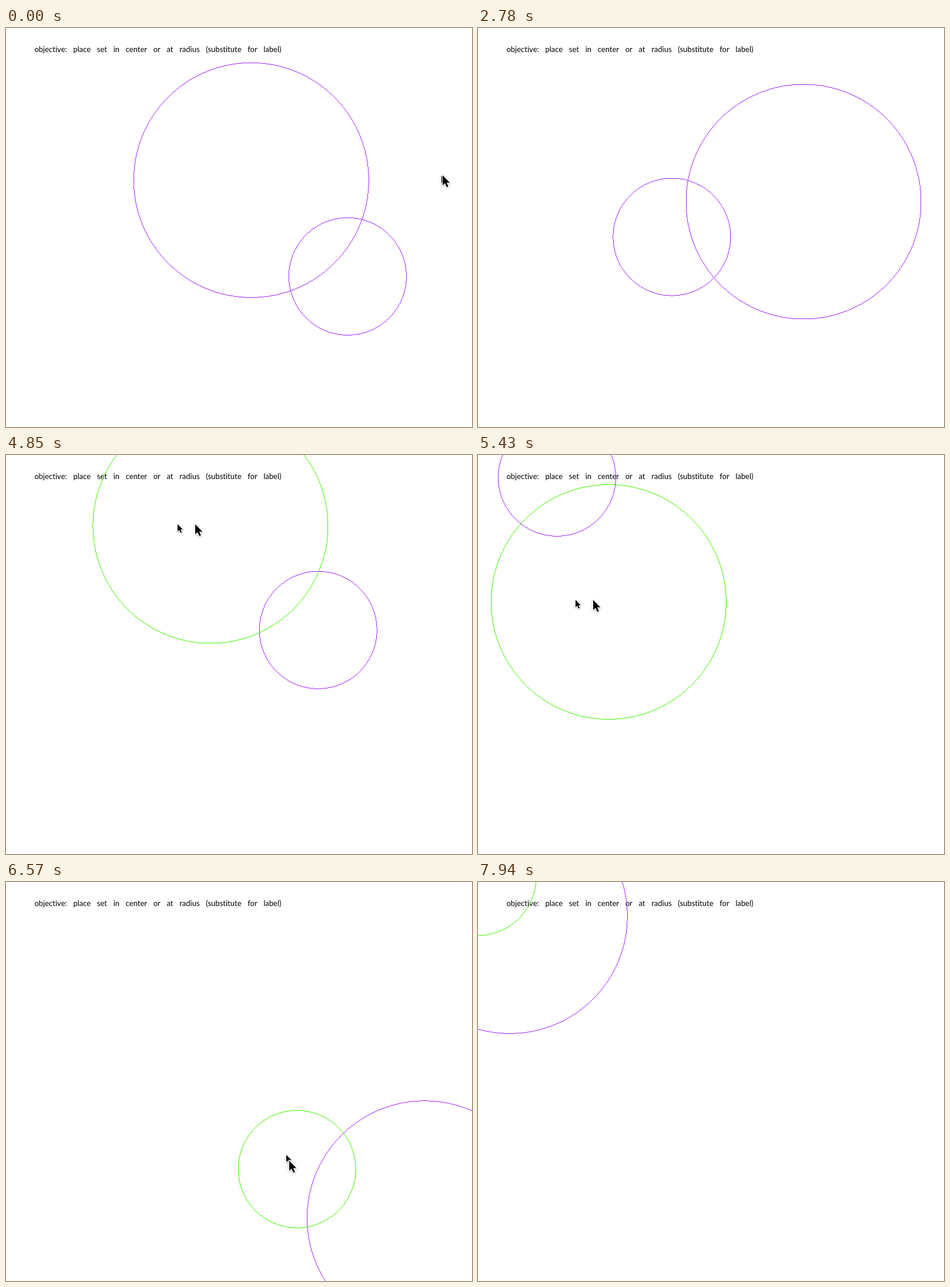
Recreate the animation shown at these times as an HTML page with a canvas. Size 793 by 680 pixels, loop 7990 ms.

```html
<!DOCTYPE html>
<html lang="en">
<head>
<meta charset="utf-8">
<title>Circle set</title>
<style>
  html, body { margin: 0; width: 100%; height: 100%; overflow: hidden; background: #fff; }
  canvas { display: block; }
</style>
</head>
<body>
<canvas id="stage" width="793" height="680"></canvas>
<script>
const LOOP = 7990, DRAG_START = 3970;
const STEP = 59.25;      // ms between redraws
const FLICK_STEPS = 3;   // redraws in one quick move
const GAP = 232;         // usual distance between the centres
const PURPLE = '#a32aff', GREEN = '#40f500';
const TEXT = 'objective: place set in center or at radius (substitute for label)';

const ctx = document.getElementById('stage').getContext('2d');
const arrow = new Path2D('M0 0V14L3.3 11 5.8 16.5 8 15.5 5.6 10.3H10Z');

// Resting places: start time, centre of the large circle, angle to the small one
const rests = [
  [-1000, 417.3, 259.3, 45],
  [60, 249, 490, -45],
  [1310, 201.3, 247.3, 107],
  [2130, 479, 359, 180],
  [2780, 704, 170, 135],
  [3490, 690, 560, 272]
];

// Turning points of the drag: redraw, centre, angle, distance
const turns = [
  [0, 688, 520, 225, GAP],
  [3, 661.95, 388.5, 95.2, GAP],
  [15, 347.95, 120.95, 44.05, 255],
  [21, 195, 170, -50, GAP],
  [27, 260, 320, -132, GAP],
  [33, 431.95, 683.95, -114.06, 252.7],
  [41, 680, 590, -148, GAP],
  [58, 690.4, 477.9, -196.1, GAP],
  [67, 54.2, 58.2, -129.4, 86.7]
];

// What is held from which redraw on, and where the two pointers grip it
const holds = [
  { from: 0, grips: [[29, -83], [42, -83]] },
  { from: 14, green: 'large', grips: [[-56, -3], [-26, -3]] },
  { from: 42, green: 'small', grips: [[-18, -24], [-13, -14]] }
];

function restPose(t) {
  const i = rests.findLastIndex(r => r[0] <= t);
  const to = rests[i], from = rests[Math.max(0, i - 1)];
  const f = Math.min(1, (Math.floor((t - to[0]) / STEP) + 1) / FLICK_STEPS);
  const mixed = to.map((v, n) => from[n] + (v - from[n]) * f);
  return [...mixed.slice(1), GAP];
}

// Smooth curve through the turning points
function dragPose(n) {
  const last = turns.length - 1;
  const i = Math.min(last - 1, turns.findLastIndex(k => k[0] <= n));
  const a = turns[i], b = turns[i + 1];
  const before = turns[Math.max(0, i - 1)], after = turns[Math.min(last, i + 2)];
  const span = b[0] - a[0], f = (n - a[0]) / span, g = 1 - f;
  return [1, 2, 3, 4].map(c => {
    const va = (b[c] - before[c]) / (b[0] - before[0]) * span;
    const vb = (after[c] - a[c]) / (after[0] - a[0]) * span;
    return g * g * (1 + 2 * f) * a[c] + f * f * (3 - 2 * f) * b[c]
      + f * g * g * va - f * f * g * vb;
  });
}

// One-pixel circle without smoothing
function ring({ x, y, r }, color) {
  ctx.fillStyle = color;
  const reach = r * Math.SQRT1_2;
  const arc = (c, d, plot) => {
    for (let p = Math.floor(c - reach); p <= c + reach; p++) {
      const h = Math.sqrt(r * r - (p + 0.5 - c) ** 2);
      plot(p, Math.floor(d - h));
      plot(p, Math.floor(d + h));
    }
  };
  arc(x, y, (p, q) => ctx.fillRect(p, q, 1, 1));
  arc(y, x, (p, q) => ctx.fillRect(q, p, 1, 1));
}

function pointer(x, y, size) {
  ctx.save();
  ctx.translate(Math.round(x), Math.round(y));
  ctx.scale(size, size);
  ctx.shadowColor = 'rgba(0,0,0,.35)';
  ctx.shadowBlur = 3;
  ctx.shadowOffsetY = 1;
  ctx.strokeStyle = '#fff';
  ctx.lineWidth = 1.6;
  ctx.stroke(arrow);
  ctx.shadowColor = 'transparent';
  ctx.fillStyle = '#000';
  ctx.fill(arrow);
  ctx.restore();
}

function pointers(x, y, [a, b]) {
  pointer(x + a[0], y + a[1], 0.88);
  pointer(x + b[0], y + b[1], 1.22);
}

function label() {
  ctx.fillStyle = '#000';
  ctx.font = '13px Lato, sans-serif';
  ctx.letterSpacing = '0.01px'; // keeps letters from joining
  ctx.wordSpacing = '7.3px';
  ctx.fillText(TEXT, 48.4, 41);
}

function draw(t) {
  const n = Math.round((t - DRAG_START) / STEP);
  const dragging = t >= DRAG_START;
  const [x, y, degrees, gap] = dragging ? dragPose(Math.min(n, 67)) : restPose(t);
  const angle = degrees * Math.PI / 180;
  const large = { x, y, r: 200 };
  const small = { x: x + gap * Math.cos(angle), y: y + gap * Math.sin(angle), r: 100 };
  const hold = dragging ? holds.findLast(h => h.from <= n) : {};

  ctx.fillStyle = '#fff';
  ctx.fillRect(0, 0, 793, 680);
  label();
  ring(large, hold.green === 'large' ? GREEN : PURPLE);
  ring(small, hold.green === 'small' ? GREEN : PURPLE);

  if (dragging) {
    const held = hold.green === 'small' ? small : large;
    pointers(held.x, held.y, hold.grips);
  } else if (t < 830) {
    const shift = t >= 770 ? 27 : t >= 60 ? 4 : 0;
    pointers(741 + shift, 251, [[0, 1], [2, 0]]);
  }
}

const begin = performance.now();
function tick() {
  draw((performance.now() - begin) % LOOP);
  requestAnimationFrame(tick);
}
tick();
</script>
</body>
</html>
```
